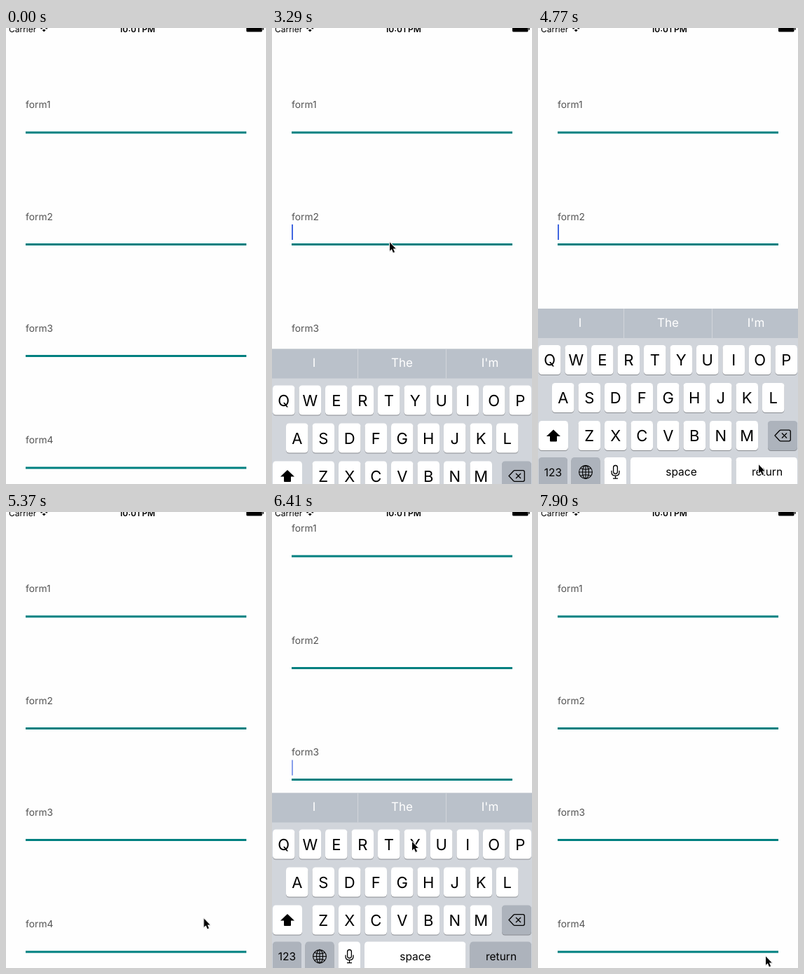
Animation, 371 px wide and 650 px high, one loop 8000 ms. Source, as an HTML page:

```html
<!DOCTYPE html>
<html lang="en">
<head>
<meta charset="utf-8">
<title>Form keyboard</title>
<style>
  html, body { margin: 0; width: 100%; height: 100%; overflow: hidden; background: #fefefe; }
  svg { display: block; width: 371px; height: 650px; }
  text { font-family: Inter, Roboto, sans-serif; text-rendering: geometricPrecision; }
  .mid { text-anchor: middle; }
  .label { font-size: 13.8px; fill: #555; }
  .hint { font-size: 17px; fill: #fff; }
  .letter { font-size: 22px; }
  .word { font-size: 15.5px; }
  .line { fill: none; stroke: #000; stroke-width: 1.3; }
</style>
</head>
<body>
<svg viewBox="0 0 371 650">
  <g id="page"></g>
  <g id="status">
    <text x="4" y="5.5" font-size="12">Carrier</text>
    <path d="M49.7 1.2A6 6 0 0 1 58.7 1.2" fill="none" stroke="#000" stroke-width="1.6"/>
    <path d="M51.7 3Q54.2 1.2 56.7 3L54.2 5.5Z"/>
    <text class="mid" x="187" y="5.5" font-size="12" font-weight="600">10:01 PM</text>
    <rect x="343" y="-5" width="22.5" height="10.5" rx="1.5"/>
    <rect x="366.2" y="-2" width="1.4" height="5" rx=".7"/>
  </g>
  <g id="keyboard"></g>
  <path id="cursor" d="M1 1.6V13.8L3.8 11.2 6 16.2 8 15.3 5.9 10.4H9.7Z"
    stroke="#fff" stroke-width="2" paint-order="stroke" stroke-linejoin="round"
    style="filter:drop-shadow(0 .7px .7px #0006)"/>
</svg>
<script>
const $ = id => document.getElementById(id);
const GAP = 159.25, GREY = '#adb3bc';
const half = v => Math.round(v * 2) / 2; // the screen has two device pixels per unit

const text = (cls, x, y, s) => `<text class="${cls}" x="${x}" y="${y}">${s}</text>`;
const rect = (x, y, w, h, fill, more = '') =>
  `<rect x="${x}" y="${y}" width="${w}" height="${h}" fill="${fill}" ${more}/>`;
const key = (x, y, w, fill = '#fff', id = '') =>
  rect(x, y + 1, w, 42, '#898c91', 'rx="4.5"') +
  rect(x, y, w, 42, fill, `rx="4.5" id="${id}"`);

// Form fields
let form = '';
for (let i = 0; i < 4; i++) {
  form += text('label', 28, half(114 + i * GAP), 'form' + (i + 1)) +
    rect(28, half(147.5 + i * GAP), 315, 3, '#008080');
}
$('page').innerHTML = form + rect(28, 280, 2, 22, '#4267e0', 'id="caret"');

// Keyboard, with its top edge at y = 0
let board = rect(0, 0, 371, 260, '#d1d5db') + rect(0, 0, 371, 42, '#bac1ca') +
  rect(122, 0, 1, 42, '#d1d5db') + rect(248, 0, 1, 42, '#d1d5db');
['I', 'The', "I'm"].forEach((s, i) => board += text('mid hint', 60 + i * 125.5, 25.5, s));
['QWERTYUIOP', 'ASDFGHJKL', 'ZXCVBNM'].forEach((row, r) => {
  const left = 188.5 - row.length * 18.75, y = 52 + r * 54;
  [...row].forEach((c, i) => {
    const x = half(left + i * 37.5);
    board += key(x, y, 31.5) + text('mid letter', x + 15.75, y + 29, c);
  });
});
board += key(1, 160, 42) + key(328, 160, 42, GREY) +
  key(1, 212, 41, GREY) + key(47.5, 212, 41, GREY) + key(94.5, 212, 31.5) +
  key(132, 212, 144.5) + key(282.5, 212, 87.5, GREY, 'return') +
  text('mid word', 21.3, 238.5, '123') + text('mid word', 204.5, 238, 'space') +
  text('mid word', 327, 238, 'return') + `
  <path d="M22 172.5L32 182H27V188.5Q27 189.5 26 189.5H18Q17 189.5 17 188.5V182H12Z"/>
  <path class="line" d="M338 181L344.5 174Q345.3 173.2 346.5 173.2H358Q360.3 173.2 360.3 175.5V186.5Q360.3 188.8 358 188.8H346.5Q345.3 188.8 344.5 188ZM348 177.5L355 184.5M355 177.5L348 184.5"/>
  <g class="line" style="stroke-width:1.1">
    <circle cx="68" cy="233" r="9.4"/><ellipse cx="68" cy="233" rx="4.5" ry="9.4"/>
    <path d="M68 223.6V242.4M58.6 233H77.4M60.5 227.5Q68 231 75.5 227.5M60.5 238.5Q68 235 75.5 238.5"/>
  </g>
  <g class="line">
    <rect x="107.6" y="223.5" width="5.8" height="12" rx="2.9"/>
    <path d="M105 231V233Q105 238.2 110.5 238.2T116 233V231M110.5 238.2V242M107 242.2H114"/>
  </g>`;
$('keyboard').innerHTML = board;

// Motion, in ms
const LOOP = 8000, STEP = 149; // the picture is refreshed once per step
const RISE = 60, SCROLL = 47.3, FALL = 30; // decay times
const edits = [
  { field: 1, scroll: 0, open: 3188, press: 4760, close: 4920 },
  { field: 2, scroll: 86, open: 6044.5, press: 7450, close: 7580 }
];
// Pointer key points: time, x, y
const path = [
  [1040, 321, 353], [1190, 315, 352], [1340, 315, 352], [1640, 244, 385],
  [1980, 172, 448], [2230, 161, 410], [2533, 167, 333], [2830, 167, 304],
  [3500, 167, 304], [4470, 314, 621], [5220, 314, 621], [5660, 185, 450],
  [6260, 185, 450], [7000, 319, 629], [7150, 324, 632], [LOOP, 324, 632]
];

const clamp = v => Math.min(1, Math.max(0, v));
const smooth = u => u * u * (3 - 2 * u);

function pointerAt(t) {
  const i = path.findIndex(p => p[0] > t);
  if (i < 1) return null;
  const [t0, x0, y0] = path[i - 1], [t1, x1, y1] = path[i];
  const u = smooth((t - t0) / (t1 - t0));
  return [x0 + (x1 - x0) * u, y0 + (y1 - y0) * u];
}

const openness = (edit, t, decay) => t < edit.close
  ? 1 - Math.exp((edit.open - t) / decay)
  : Math.exp((edit.close - t) / FALL);

// The caret blinks once, dark around 700 ms after focus
const caretAlpha = age => clamp((Math.abs(age - 700) - 200) / 220);

const move = (id, x, y) => $(id).setAttribute('transform', `translate(${half(x)} ${half(y)})`);
const show = (id, alpha) => $(id).setAttribute('opacity', alpha);

function draw(now) {
  const t = Math.floor(now % LOOP / STEP) * STEP;
  const pointer = pointerAt(t);
  show('cursor', pointer ? 1 : 0);
  if (pointer) move('cursor', ...pointer);

  const edit = edits.findLast(e => t >= e.open);
  const focused = edit && t < edit.close;
  move('keyboard', 0, 658 - 258 * (edit ? openness(edit, t, RISE) : 0));
  move('page', 0, edit ? -edit.scroll * openness(edit, t, SCROLL) : 0);
  $('return').setAttribute('fill', focused && t >= edit.press ? '#fff' : GREY);
  show('caret', focused ? caretAlpha(t - edit.open) : 0);
  if (focused) move('caret', 0, (edit.field - 1) * GAP);
}

const begin = performance.now();
function tick() {
  draw(performance.now() - begin);
  requestAnimationFrame(tick);
}
tick();
</script>
</body>
</html>
```
